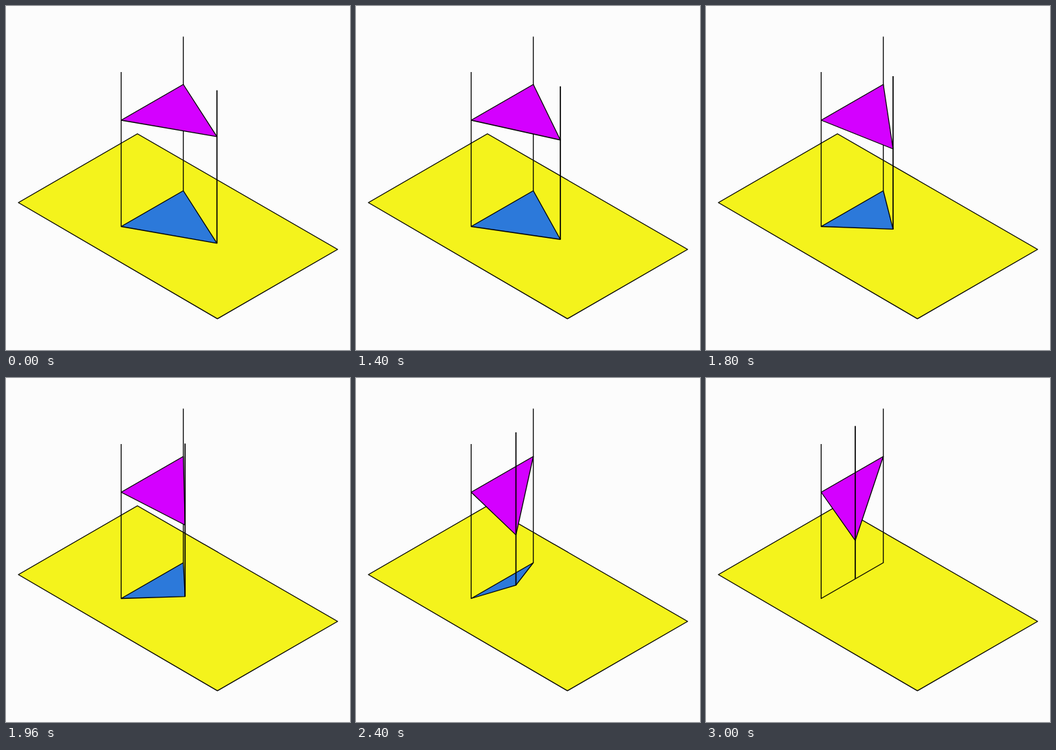
An HTML page that plays this animation: 500 px wide and 500 px high, repeating every 4320 ms.

```html
<!DOCTYPE html>
<html lang="en">
<head>
<meta charset="utf-8">
<title>Triangle projection</title>
<style>
  html, body { margin: 0; width: 100%; height: 100%; overflow: hidden; background: #fcfcfc; }
  svg { display: block; width: 100%; height: 100%; }
</style>
</head>
<body>
<svg viewBox="0 0 500 500" fill="none" stroke="#000" stroke-width="1.3" stroke-linejoin="round">
  <path fill="#f4f31c" d="M18 285.7L191 185.7L482 353.8L307.3 454.6Z"/>
  <path d="M257.7 44.5V268.5"/>
  <path id="shadow" fill="#2c79da"/>
  <path id="triangle" fill="#d400ff"/>
  <path d="M167.4 96V320.5"/>
  <path id="pole" stroke-width="1.7"/>
</svg>
<script>
const LOOP = 4320, STEP = 40, START = 1020, DURATION = 1980;
const shadow = document.getElementById('shadow');
const triangle = document.getElementById('triangle');
const pole = document.getElementById('pole');
const mix = (a, b, p) => a + (b - a) * p;

// The hinge turns a quarter circle while slowing down to a stop.
function progress(time) {
  const s = Math.min(1, Math.max(0, (time - START) / DURATION));
  return 1 - Math.cos(Math.PI / 2 * Math.sin(Math.PI / 2 * s));
}

function draw(now) {
  const time = Math.floor(now % LOOP / STEP) * STEP;
  const p = progress(time);
  const x = mix(306.6, 216.9, p);
  const floorY = mix(344.9, 292, p);
  shadow.setAttribute('d', `M167.4 320.5L257.7 268.5L${x} ${floorY}Z`);
  triangle.setAttribute('d', `M167.4 166L257.7 114L${x} ${mix(189.8, 236.2, p)}Z`);
  pole.setAttribute('d', `M${x} ${mix(122.5, 69.8, p)}V${floorY}`);
  requestAnimationFrame(draw);
}
draw(performance.now());
</script>
</body>
</html>
```
